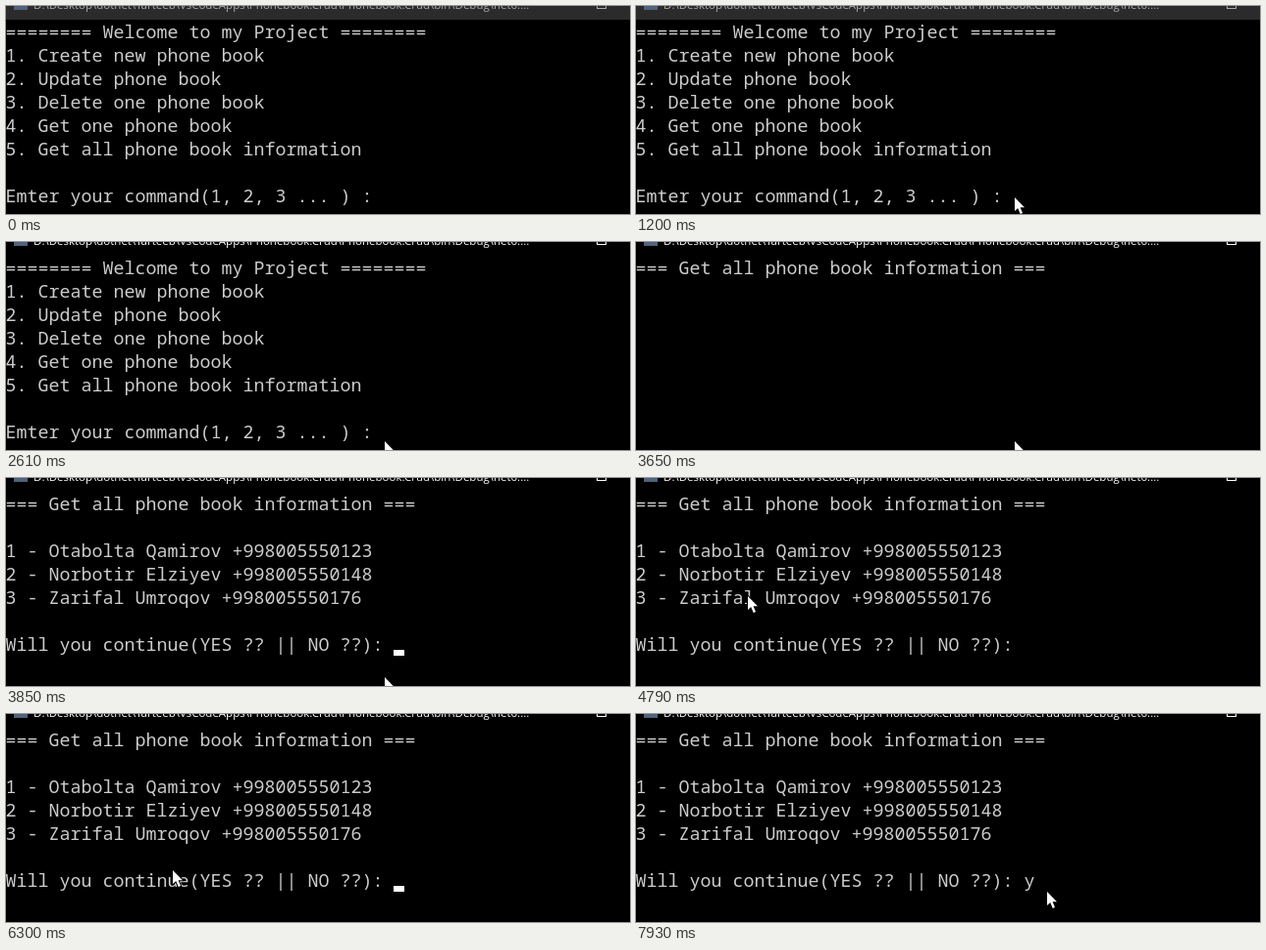
Animation of 636 by 213 pixels, one loop 8 s. Source, as an HTML page with a canvas:

```html
<!DOCTYPE html>
<html lang="en">
<head>
<meta charset="utf-8">
<title>Console</title>
<style>
  html, body { margin: 0; width: 100%; height: 100%; overflow: hidden; background: #000; }
  canvas { display: block; }
</style>
</head>
<body>
<canvas id="stage" width="636" height="213"></canvas>
<script>
const ctx = document.getElementById('stage').getContext('2d');
const LOOP = 8000, CELL_W = 11, CELL_H = 24, TOP = 14;
const TICK = 70, BLINK = 526;
const FOCUS = 1540, CARET_ON = 2080, CHOOSE = 3520, CLEAR = 3650, PRINT = 3780, ANSWER = 7930;
const MONO = '18.33px "Noto Sans Mono", monospace';
const UI = '11.5px "Open Sans", sans-serif';
const PATH = 'D:\\Desktop\\dotnet\\Tarteeb\\VsCodeApps\\Phonebook.Crud\\Phonebook.Crud\\bin\\Debug\\net6....';

const MENU = `======== Welcome to my Project ========
1. Create new phone book
2. Update phone book
3. Delete one phone book
4. Get one phone book
5. Get all phone book information

Emter your command(1, 2, 3 ... ) : `;
const HEADER = '=== Get all phone book information ===';
const LIST = `${HEADER}

1 - Otabolta Qamirov +998005550123
2 - Norbotir Elziyev +998005550148
3 - Zarifal Umroqov +998005550176

Will you continue(YES ?? || NO ??): `;

// pointer glides: start, end, target x, target y, vertical bow
const HOME = [393, 171];
const GLIDES = [
  [730, 800, 386, 171, 0],
  [1000, 1200, 386, 196, 0],
  [2080, 2610, 386, 204, 0],
  [4510, 4790, 114, 121, 0],
  [5120, 5890, 329, 113, 10],
  [5960, 6230, 134, 158, -65],
  [6230, 6720, 385, 170, 0],
  [6790, 6930, 419, 182, 0]
];
const ARROW = [[0, 0], [0, 14], [3.2, 11], [5.7, 17], [8, 16], [5.6, 10.3], [10, 10.3]];

function screenAt(t) {
  if (t < CHOOSE) return MENU;
  if (t < CLEAR) return MENU + '5';
  if (t < PRINT) return HEADER;
  return t < ANSWER ? LIST : LIST + 'y';
}

function caretLit(t) {
  if (t < CARET_ON || t >= ANSWER) return false;
  if (t >= CLEAR && t < PRINT) return false;
  const fresh = t >= PRINT && t < PRINT + BLINK;
  return fresh || Math.floor((t - CARET_ON) / BLINK) % 2 === 0;
}

// the pointer advances in whole ticks within each glide
function pointerAt(t) {
  let [x, y] = HOME;
  for (const [t0, t1, tx, ty, bow] of GLIDES) {
    if (t < t0) break;
    const k = t >= t1 ? 1 : Math.floor((t - t0) / TICK) * TICK / (t1 - t0);
    x += (tx - x) * k;
    y += (ty - y) * k + bow * Math.sin(Math.PI * k);
  }
  return [Math.round(x), Math.round(y)];
}

function drawTitle(focused) {
  ctx.fillStyle = focused ? '#000' : '#2b2b2b';
  ctx.fillRect(0, 0, 636, TOP);
  ctx.fillStyle = '#50627c';
  ctx.fillRect(8, 0, 14, 4);
  ctx.font = UI;
  ctx.fillStyle = ctx.strokeStyle = focused ? '#fff' : '#aaa';
  ctx.fillText(PATH, 28, 3);
  ctx.lineWidth = 1;
  ctx.strokeRect(602.5, -6.5, 9, 9);
}

function drawPointer([x, y]) {
  ctx.beginPath();
  for (const [dx, dy] of ARROW) ctx.lineTo(x + dx, y + dy);
  ctx.closePath();
  ctx.lineWidth = 2;
  ctx.strokeStyle = '#000';
  ctx.stroke();
  ctx.fillStyle = '#fff';
  ctx.fill();
}

function draw(t) {
  ctx.fillStyle = '#000';
  ctx.fillRect(0, 0, 636, 213);
  drawTitle(t >= FOCUS);

  const lines = screenAt(t).split('\n'), last = lines.length - 1;
  ctx.font = MONO;
  ctx.fillStyle = '#ccc';
  lines.forEach((line, row) => ctx.fillText(line, -0.5, TOP + row * CELL_H + 19));

  if (caretLit(t)) {
    ctx.fillStyle = '#fff';
    ctx.fillRect(lines[last].length * CELL_W - 1, TOP + last * CELL_H + 18, CELL_W, 6);
  }
  if (t >= GLIDES[0][0]) drawPointer(pointerAt(t));
}

const start = performance.now();
function loop() {
  draw((performance.now() - start) % LOOP);
  requestAnimationFrame(loop);
}
loop();
</script>
</body>
</html>
```
